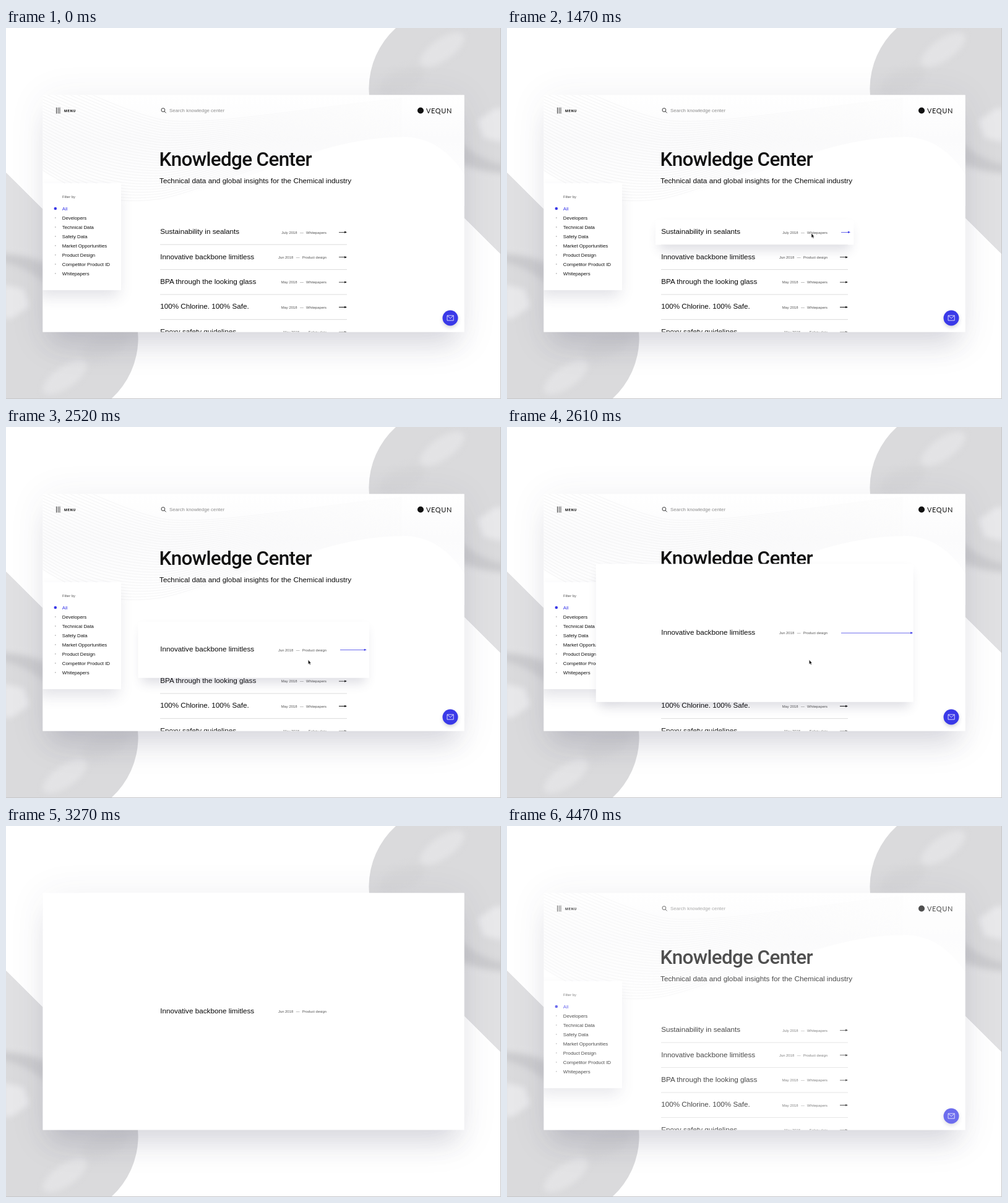
Animation of 800x600 px, one loop 4.5 s. Source, as an HTML page:

```html
<!DOCTYPE html>
<html lang="en">
<head>
<meta charset="utf-8">
<title>Knowledge Center</title>
<style>
  html, body { margin: 0; width: 100%; height: 100%; overflow: hidden; background: #fff; }
  svg { display: block; width: 100vw; height: 100vh; font-family: "Liberation Sans", Arial, sans-serif; }
  .soft { filter: blur(5px); }
  .shade { fill: #3c3c5c; }
  .row { font-size: 11.7px; fill: #0a0a0a; }
  .meta { font-size: 5.9px; fill: #555; }
  .side { font-size: 7.8px; fill: #111; }
  .line { stroke: #dcdcdc; stroke-width: 1; }
</style>
</head>
<body>
<svg viewBox="0 0 800 600" preserveAspectRatio="none">
  <defs>
    <clipPath id="card"><rect x="59.5" y="108.5" width="681" height="383"/></clipPath>
    <clipPath id="leaf"><path d="M630 0A133 133 0 0 0 629 196L800 366V0Z"/></clipPath>
    <linearGradient id="waveFade" gradientUnits="userSpaceOnUse" x1="60" x2="600" y1="0" y2="0">
      <stop stop-color="#ededee"/><stop offset=".5" stop-color="#f2f2f3"/><stop offset="1" stop-color="#fafafa"/>
    </linearGradient>
    <linearGradient id="haze" x1="0" x2="0" y1="0" y2="1">
      <stop stop-color="#fff"/><stop offset=".4" stop-color="#fbfbfc"/><stop offset="1" stop-color="#fff"/>
    </linearGradient>
    <g id="stone" clip-path="url(#leaf)">
      <rect x="580" width="220" height="370" fill="#dadadc"/>
      <g class="soft">
        <ellipse cx="705" cy="35" rx="42" ry="17" fill="#e3e3e5" transform="rotate(-35 705 35)"/>
        <ellipse cx="640" cy="85" rx="40" ry="18" fill="#d6d6d8" transform="rotate(-25 640 85)"/>
        <path d="M735 185Q765 215 810 222V235Q765 232 735 217Z" fill="#cbcbce"/>
        <path d="M790 130L762 150L772 178L805 185V130Z" fill="#e8e8ea"/>
        <path d="M735 224Q770 236 810 237V380L735 320Z" fill="#e0e0e2"/>
      </g>
    </g>
  </defs>

  <rect width="800" height="600" fill="#fff"/>
  <use href="#stone"/>
  <use href="#stone" transform="rotate(180 400 300)"/>
  <rect class="shade" x="60" y="112" width="680" height="400" opacity=".07" style="filter:blur(32px)"/>
  <rect class="shade" x="72" y="150" width="656" height="360" opacity=".15" style="filter:blur(20px)"/>
  <path d="M799.5 0V599.5H0" fill="none" stroke="#c6c6c8"/>

  <g clip-path="url(#card)">
    <rect x="59" y="108" width="682" height="384" fill="#fff"/>
    <g id="page">
      <rect x="59" y="108" width="682" height="180" fill="url(#haze)"/>
      <path d="M59 230C130 275 180 285 245 277C390 260 500 176 640 176C690 176 720 205 741 237V492H59Z" fill="#fff"/>
      <g id="waves" fill="none" stroke="url(#waveFade)" stroke-width=".7"></g>

      <path d="M81.5 128.5V138.5M84.2 128.5V138.5M86.9 128.5V138.5" stroke="#222" stroke-width=".9"/>
      <text x="94" y="135.7" font-size="5.7" font-weight="700" letter-spacing=".75" fill="#111" font-family="Roboto, sans-serif">MENU</text>
      <g fill="none" stroke="#333"><circle cx="253.9" cy="132.6" r="2.9"/><path d="M256 134.8L258.6 137.4"/></g>
      <text x="264" y="136.2" font-size="7.9" fill="#8b8b8b">Search knowledge center</text>
      <circle cx="670" cy="133.5" r="5" fill="#111"/>
      <text x="679" y="137.6" font-size="11" letter-spacing=".6" fill="#111" font-family="Lato, sans-serif">VEQUN</text>

      <text x="247.5" y="223" font-size="31.5" font-weight="500" letter-spacing="-.7" fill="#111" font-family="Roboto, sans-serif">Knowledge Center</text>
      <text x="248" y="250.6" font-size="11.8" fill="#0a0a0a">Technical data and global insights for the Chemical industry</text>

      <g id="rows"></g>

      <rect class="shade" x="52" y="266" width="130" height="168" opacity=".15" style="filter:blur(12px)"/>
      <rect x="59" y="251" width="127" height="173" fill="#fff"/>
      <text class="meta" x="91" y="274.6">Filter by</text>
      <g id="filters"></g>

      <circle class="shade" cx="718" cy="472" r="12" opacity=".25" style="filter:blur(3px)"/>
      <circle cx="718" cy="469" r="12.5" fill="#3a39e8"/>
      <path d="M713 465H723.2V473H713ZL718.1 469.6L723.2 465" fill="none" stroke="#fff" stroke-width=".8"/>
    </g>
    <g id="panels"></g>
    <path id="cursor" d="M0 0V7.2L1.6 5.8L2.7 8.2L3.8 7.7L2.8 5.4H4.7Z" fill="#111" stroke="#fff" stroke-width=".4"/>
  </g>
</svg>

<script>
const LOOP = 4500, BLUE = '#3a39e8', PITCH = 40.4, FIRST_Y = 330.3;
const $ = id => document.getElementById(id);
const lerp = (a, b, p) => a + (b - a) * p;
const ramp = (t, from, to) => Math.min(1, Math.max(0, (t - from) / (to - from)));
const sine = p => (1 - Math.cos(Math.PI * p)) / 2;

// title, date, category, left edge of the category
const entries = [
  ['Sustainability in sealants', 'July 2018', 'Whitepapers', 485],
  ['Innovative backbone limitless', 'Jun 2018', 'Product design', 478.7],
  ['BPA through the looking glass', 'May 2018', 'Whitepapers', 485],
  ['100% Chlorine. 100% Safe.', 'May 2018', 'Whitepapers', 485],
  ['Epoxy safety guidelines', 'May 2018', 'Safety data', 488.6],
];
const rowY = i => FIRST_Y + i * PITCH;

function rowText([title, date, category, x], y) {
  return `<text class="row" x="249.2" y="${y + 2.9}">${title}</text>
    <g class="meta"><text x="${x - 14.5}" y="${y + 2.2}" text-anchor="end">${date}</text>
    <text x="${x - 10}" y="${y + 2.2}">—</text><text x="${x}" y="${y + 2.2}">${category}</text></g>`;
}
function arrowPath(start, tip, y) {
  return `M${start} ${y - .4}H${tip - 4}V${y - 1.7}L${tip} ${y}L${tip - 4} ${y + 1.7}V${y + .4}H${start}Z`;
}

for (let i = 0; i < 32; i++) {
  $('waves').innerHTML += `<path d="M59 ${230 - 5 * i}C130 ${275 - 5.6 * i} 180 ${285 - 5 * i} 245 ${277 - 4.2 * i}
    S500 ${176 - 1.6 * i} 640 ${176 - 2 * i}"/>`;
}
entries.forEach((entry, i) => {
  const y = rowY(i);
  $('rows').innerHTML += rowText(entry, y) + `<path d="${arrowPath(538, 551, y)}" fill="#111"/>
    <path class="line" d="M249 ${y + 19.9}H551"/>`;
});
['All', 'Developers', 'Technical Data', 'Safety Data', 'Market Opportunities', 'Product Design',
 'Competitor Product ID', 'Whitepapers'].forEach((name, i) => {
  const y = 292 + 15 * i;
  $('filters').innerHTML += `<circle cx="79.8" cy="${y}" r="${i ? .9 : 2.3}" fill="${i ? '#bbb' : BLUE}"/>
    <text class="side" x="90.8" y="${y + 2.8}" ${i ? '' : `style="fill:${BLUE}"`}>${name}</text>`;
});

const panels = [0, 1].map(i => {
  const group = document.createElementNS('http://www.w3.org/2000/svg', 'g');
  group.innerHTML = `<rect class="shade" opacity=".17" style="filter:blur(9px)"/><rect fill="#fff"/>
    <g>${rowText(entries[i], rowY(i))}</g><path fill="${BLUE}"/>`;
  $('panels').append(group);
  const [shadow, sheet, text, arrow] = group.children;
  return { group, shadow, sheet, text, arrow, y: rowY(i) };
});

function setRect(el, x, y, w, h) {
  Object.entries({ x, y, width: w, height: h }).forEach(([k, v]) => el.setAttribute(k, Math.max(0, v)));
}
function drawPanel(panel, hover, grow, retract, opacity) {
  const w = lerp(320.5, 682, grow), h = lerp(40.6, 384, grow);
  const y = lerp(panel.y, 300, grow), x = 400.2 - w / 2;
  setRect(panel.shadow, x + 6, y - h / 2 + 12, w - 12, h - 4);
  setRect(panel.sheet, x, y - h / 2, w, h);
  panel.text.setAttribute('transform', `translate(0 ${y - panel.y})`);
  const start = lerp(lerp(538, 540, hover), 746, retract);
  const tip = lerp(551, 555, hover) + 190 * grow;
  panel.arrow.setAttribute('d', arrowPath(start, Math.max(tip, start + 4), y));
  panel.group.setAttribute('opacity', hover * opacity);
}

function cursorAt(t) {
  const enter = sine(ramp(t, 30, 870)), next = sine(ramp(t, 1460, 1890)), leave = sine(ramp(t, 2800, 3270));
  return [519 - 27 * enter - 3.6 * next - 4.4 * leave, 98 + 234 * enter + 44.5 * next + 116 * leave];
}

function draw(t) {
  const hoverFirst = sine(ramp(t, 680, 870)) * (1 - sine(ramp(t, 1660, 1870)));
  const hoverSecond = sine(ramp(t, 1660, 1870));
  const grow = ramp(t, 2340, 2670) ** 3.2;
  const retract = sine(ramp(t, 2800, 3270));
  drawPanel(panels[0], hoverFirst, 0, 0, 1);
  drawPanel(panels[1], hoverSecond, grow, retract, 1 - ramp(t, 3610, 4090));
  $('page').setAttribute('opacity', t < 2670 ? 1 : ramp(t, 4095, 4605));
  $('cursor').setAttribute('transform', `translate(${cursorAt(t)})`);
}

function frame() {
  draw(performance.now() % LOOP);
  requestAnimationFrame(frame);
}
frame();
</script>
</body>
</html>
```
